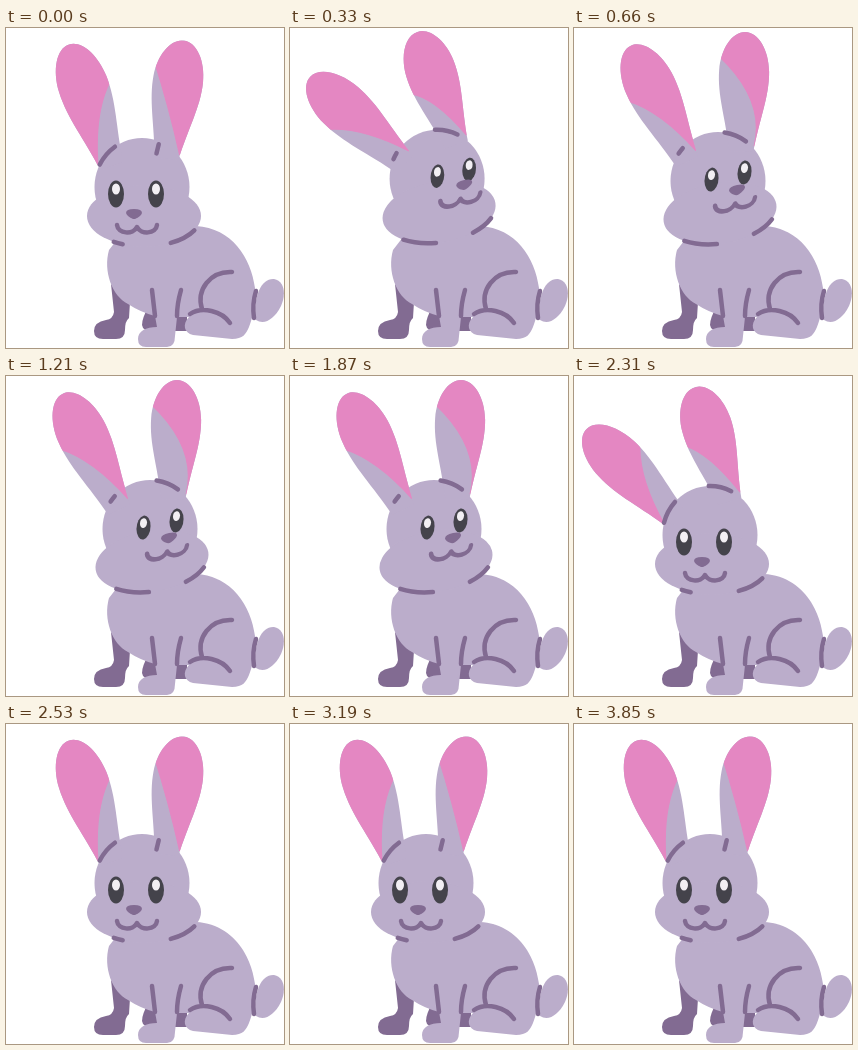
These frames come from a looping animation (278 px wide and 320 px high, 3.96 s). An HTML page:

```html
<!DOCTYPE html>
<html lang="en">
<head>
<meta charset="utf-8">
<title>Rabbit</title>
<style>
html, body { margin: 0; width: 100%; height: 100%; overflow: hidden; background: #fff; }
svg { display: block; width: 100vw; height: 100vh; }
.fur { fill: #bbadcb; }
.dark { fill: #826b92; }
.pink { fill: #e487c2; }
.line { fill: none; stroke: #826b92; stroke-width: 4.500; stroke-linecap: round; stroke-linejoin: round; }
.eye { fill: #44434b; }
.glint { fill: #f2eff3; }
</style>
</head>
<body>
<svg viewBox="0 0 278 320">
  <defs>
    <path id="ear" d="M-12 10C-17 -25 -26 -48 -25 -75C-24 -98 -13 -116 0 -116C13 -116 24 -98 25 -75C26 -48 17 -25 12 10Z"/>
    <clipPath id="inside"><use href="#ear"/></clipPath>
    <g id="look"><ellipse class="eye" rx="8" ry="13.500"/><ellipse class="glint" cy="-5" rx="4" ry="5.500"/></g>
  </defs>

  <path class="fur" d="M250 292C247 277 252 250 268 251C279 253 280 267 275 278C268 292 258 297 250 292Z"/>
  <path class="dark" d="M105 256L108 284Q107 291 100 292Q88 294 88 303Q88 311 97 311H110Q119 311 119 302Q119 293 123 290L124 274Z"/>
  <path class="dark" d="M142 280Q136 290 136 297Q137 303 145 303H181V280Z"/>
  <path class="fur" d="M103 222C97 243 106 268 122 276Q134 284 149 288L151 299C140 299 132 303 132 311Q132 319 140 319H161Q169 319 169 308L171 289H183C176 296 178 305 187 307L226 311C237 311 240 306 243 299C247 289 250 275 249 260C245 230 226 200 190 198L120 200Z"/>
  <path class="line" d="M146 262L149 288M175 262Q171 276 171 288M226 244C204 243 190 262 196 281M184 286C196 278 216 283 224 295M250 263Q246 276 248 290"/>

  <ellipse id="skull" class="fur" rx="47.500" ry="49"/>
  <ellipse id="cheeks" class="fur" rx="57" ry="30.500"/>
  <g id="earL"><use href="#ear" class="fur"/><g clip-path="url(#inside)"><path id="pinkL" class="pink"/></g></g>
  <g id="earR"><use href="#ear" class="fur"/><g clip-path="url(#inside)"><path id="pinkR" class="pink"/></g></g>
  <path id="marks" class="line"/>
  <g id="face">
    <use id="eyeL" href="#look"/>
    <use id="eyeR" href="#look"/>
    <g id="muzzle">
      <path class="dark" d="M-8 -1Q-8 -5 0 -5Q8 -5 8 -1Q7 2 2 4.500Q0 5.500 -2 4.500Q-7 2 -8 -1Z"/>
      <path id="mouth" class="line" d="M-20 11C-19 20 -4 21 0 13C4 21 19 20 20 11"/>
    </g>
  </g>
</svg>
<script>
const STEP = 110, COUNT = 36, LOOK = 4, BACK = 17, SETTLE = 6;
const LEAN_FRONT = -5.5, LEAN_SIDE = -12;
const { sin, cos, sqrt, min, max, abs, PI } = Math;
const $ = id => document.getElementById(id);
const move = (id, value) => $(id).setAttribute("transform", value);

// turn: 0 faces the viewer, 1 looks aside. lean: shared angle of both ears.
function poseAt(n) {
  if (n <= 0 || n >= BACK + SETTLE) return { turn: 0, lean: LEAN_FRONT };
  if (n <= LOOK) {
    const u = n / LOOK, swing = sin(PI * u);
    return { turn: u + 1.2 * u * swing, lean: LEAN_SIDE - 30 * swing };
  }
  if (n <= BACK) return { turn: 1, lean: LEAN_SIDE };
  const u = (n - BACK) / SETTLE;
  return {
    turn: max(0, 1 - 1.5 * u),
    lean: LEAN_SIDE + (LEAN_FRONT - LEAN_SIDE) * u + (45 - 27 * u) * sin(2 * PI * u)
  };
}

// Point on a tilted ellipse; degrees run clockwise from the right.
function onEllipse(e, deg, scale = 1) {
  const a = deg * PI / 180, t = e.tilt * PI / 180;
  const x = e.rx * scale * cos(a), y = e.ry * scale * sin(a);
  return [e.x + x * cos(t) - y * sin(t), e.y + x * sin(t) + y * cos(t)];
}

const arc = (e, from, to) =>
  `M${onEllipse(e, from)}A${e.rx} ${e.ry} ${e.tilt} 0 ${to > from ? 1 : 0} ${onEllipse(e, to)}`;

function drawEar(id, skull, angle, lean, length, flip, split, fold) {
  const [x, y] = onEllipse(skull, angle - 90, 0.94);
  move("ear" + id, `translate(${x} ${y}) rotate(${lean}) scale(1 ${length / 116})`);
  move("pink" + id, `scale(${flip} 1)`);
  $("pink" + id).setAttribute("d", `M12 4Q${fold} -45 -27 ${-split}V-130H40V4Z`);
}

function draw(n) {
  const { turn, lean } = poseAt(n);
  const root = sqrt(turn), tip = min(1, 2 * turn), aside = turn > 0.3;
  const skull = { x: 136 + 8 * turn, y: 159 - 6 * turn, rx: 47.5, ry: 49, tilt: 0 };
  const cheeks = { x: 138 + 8 * turn, y: 188 - 3 * turn, rx: 57, ry: 30.5, tilt: -9 * tip };
  move("skull", `translate(${skull.x} ${skull.y})`);
  move("cheeks", `translate(${cheeks.x} ${cheeks.y}) rotate(${cheeks.tilt})`);

  // Ear roots slide around the skull as the ears lean.
  const left = lean / 2 - 46, right = lean / 2 + 38;
  const fold = 28 * max(0, 1 - 3 * abs(turn - 1));
  drawEar("L", skull, left, lean - 14, 119, aside ? 1 : -1, 68, -2);
  drawEar("R", skull, right, lean + 14, 110, 1, 90 + 1.6 * min(0, lean + 12), fold - 6);

  const half = aside ? 4 : 14, crease = 22 - 45 * turn - 90;
  const brow = lean > -10
    ? `M${onEllipse(skull, crease, 0.94)}L${onEllipse(skull, crease + 2, 0.75)}`
    : arc(skull, right - 114, right - 86);
  $("marks").setAttribute("d", brow +
    arc(skull, left - 90 - half, left - 90 + half) +
    arc(cheeks, 122 + 12 * tip, 112 - 14 * tip) +
    arc(cheeks, 62 - 4 * tip, 28));

  const gap = 20 - 3.5 * root, size = 1 - 0.12 * root;
  move("face", `translate(${130 + 24 * turn} ${166 - 18 * root}) skewY(${-12 * tip})`);
  move("eyeL", `translate(${-gap} 0) scale(${size})`);
  move("eyeR", `translate(${gap} 0) scale(${size})`);
  move("muzzle", `translate(${11 * root - 2} ${20 - 4 * turn})`);
  move("mouth", `translate(${3 - 5 * turn} 0)`);
}

let start, shown = 0;
function tick(now) {
  start ??= now;
  const n = Math.floor((now - start) / STEP) % COUNT;
  if (n !== shown) draw(shown = n);
  requestAnimationFrame(tick);
}
draw(0);
requestAnimationFrame(tick);
</script>
</body>
</html>
```
